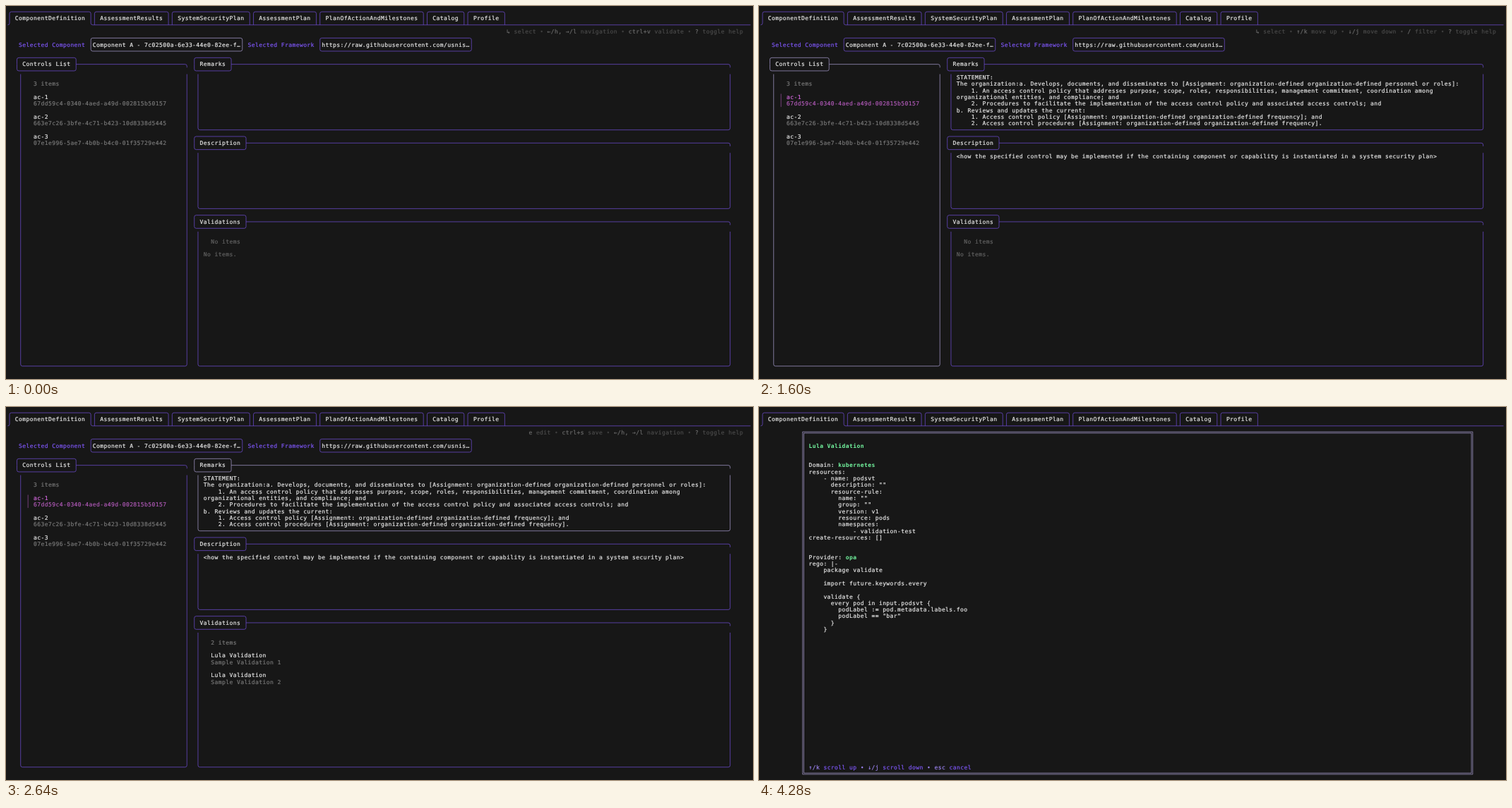
An HTML page for the animation above (8.4 s loop, 1058 by 529 pixels).

```html
<!DOCTYPE html>
<html lang="en">
<head>
<meta charset="utf-8">
<title>Compliance console</title>
<style>
  html, body { margin: 0; width: 100%; height: 100%; overflow: hidden; background: #171717; }
  svg { display: block; width: 1058px; height: 529px; }
  text {
    font: 8px "DejaVu Sans Mono", "Liberation Mono", monospace;
    letter-spacing: .418px;
    white-space: pre;
    text-rendering: geometricPrecision;
  }
  tspan { color: #e8e8e8; fill: currentColor; stroke: currentColor; stroke-width: .2; }
  path { fill: none; stroke: #7d56f4; stroke-width: .62; }
  .focus path, .modal path { stroke: #bfb2eb; }
  .label { color: #7d56f4; }
  .dim { color: #777; }
  .empty { color: #626262; }
  .key { color: #6a6a6a; }
  .desc { color: #4a4a4a; }
  .dot { color: #404040; }
  .good { color: #73f59f; font-weight: bold; stroke: none; }
  .modalKey { color: #9a82ee; }
  .bar { display: none; }
  .picked .bar { display: inline; stroke: #ad58b4; }
  .picked .name { color: #d468de; }
  .picked .dim { color: #ad58b4; }
  .hidden { display: none; }
</style>
</head>
<body>
<svg viewBox="0 0 1058 529"></svg>
<script>
const CELL_W = 5.234, CELL_H = 9.306, LEFT = 2.4, RADIUS = 2.6;
const LOOP = 8400;
const svg = document.querySelector('svg');

const midX = col => LEFT + (col + .5) * CELL_W;
const midY = row => 8.2 + row * CELL_H;

function add(parent, tag, attrs = {}) {
  const el = document.createElementNS('http://www.w3.org/2000/svg', tag);
  for (const name in attrs) el.setAttribute(name, attrs[name]);
  return parent.appendChild(el);
}
const group = (parent, cls = '') => add(parent, 'g', { class: cls });
const line = (parent, d, cls = '') => add(parent, 'path', { d, class: cls });

// Each run is a plain string or a [string, class] pair.
function write(parent, col, row, ...runs) {
  const el = add(parent, 'text', { x: LEFT + col * CELL_W, y: midY(row) + 2.8 });
  for (const run of runs) {
    const [str, cls] = [].concat(run);
    add(el, 'tspan', { class: cls || '' }).textContent = str;
  }
}
const writeLines = (parent, col, row, lines) =>
  lines.forEach((str, i) => str && write(parent, col, row + i, str));

function roundTop(x0, x1, top) {
  const r = RADIUS;
  return `V${top + r}Q${x0} ${top} ${x0 + r} ${top}H${x1 - r}Q${x1} ${top} ${x1} ${top + r}`;
}
function roundBottom(x0, x1, bottom) {
  const r = RADIUS;
  return `V${bottom - r}Q${x0} ${bottom} ${x0 + r} ${bottom}H${x1 - r}Q${x1} ${bottom} ${x1} ${bottom - r}`;
}
function box(parent, c0, r0, c1, r1) {
  const x0 = midX(c0), x1 = midX(c1), top = midY(r0), bottom = midY(r1), y = (top + bottom) / 2;
  line(parent, `M${x0} ${y}${roundTop(x0, x1, top)}V${y}M${x0} ${y}${roundBottom(x0, x1, bottom)}V${y}`);
}

function drawTabs() {
  const names = ['ComponentDefinition', 'AssessmentResults', 'SystemSecurityPlan', 'AssessmentPlan',
    'PlanOfActionAndMilestones', 'Catalog', 'Profile'];
  const top = midY(0), base = midY(2), r = RADIUS;
  let col = 0;
  names.forEach((name, i) => {
    const end = col + name.length + 3, x0 = midX(col), x1 = midX(end), cap = roundTop(x0, x1, top);
    line(svg, i
      ? `M${x0} ${base}${cap}V${base}`
      : `M${LEFT} ${base}Q${x0} ${base} ${x0} ${base - r}${cap}V${base - r}Q${x1} ${base} ${x1 + r} ${base}H1054.5`);
    write(svg, col + 2, 1, name);
    col = end + 1;
  });
}

function panel(parent, title, col, row, right, bottom) {
  const g = group(parent), frame = group(g);
  const end = col + title.length + 3;
  const x0 = midX(col + 1), x1 = midX(right), y = midY(row), r = RADIUS;
  const sideTop = midY(row + 1.5);
  box(frame, col, row - 1, end, row + 1);
  line(frame, `M${midX(end)} ${y}H${x1 - r}Q${x1} ${y} ${x1} ${y + r}V${midY(row + .5)}`);
  line(frame, `M${x0} ${sideTop}${roundBottom(x0, x1, midY(bottom))}V${sideTop}`);
  write(g, col + 2, row, title);
  return { g, frame };
}

function selector(parent, label, col, value) {
  write(parent, col, 5, [label, 'label']);
  const frame = group(parent), left = col + 19;
  box(frame, left, 4, left + 41, 6);
  write(parent, left + 1, 5, value);
  return { frame };
}

function item(parent, col, row, name, detail) {
  const g = group(parent);
  line(g, `M${midX(col - 2)} ${midY(row - .5)}V${midY(row + 1.5)}`, 'bar');
  write(g, col, row, [name, 'name']);
  write(g, col, row + 1, [detail, 'dim']);
  return g;
}

function helpRuns(entries, keyCls, descCls, dotCls) {
  return entries.flatMap(([key, text], i) =>
    [...(i ? [[' • ', dotCls]] : []), [key, keyCls], [' ' + text, descCls]]);
}
function help(parent, entries) {
  const g = group(parent, 'hidden');
  const runs = helpRuns([...entries, ['?', 'toggle help']], 'key', 'desc', 'dot');
  const length = runs.reduce((sum, [str]) => sum + str.length, 0);
  write(g, 199 - length, 3, ...runs);
  return g;
}

drawTabs();
const main = group(svg);
const move = [['↑/k', 'move up'], ['↓/j', 'move down'], ['/', 'filter']];
const navigate = ['←/h, →/l', 'navigation'];
const helps = {
  select: help(main, [['↳', 'select'], navigate, ['ctrl+v', 'validate']]),
  list: help(main, [['↳', 'select'], ...move]),
  edit: help(main, [['e', 'edit'], ['ctrl+s', 'save'], navigate]),
  detail: help(main, [['d', 'detail'], ...move])
};
const parts = {
  component: selector(main, 'Selected Component', 3, 'Component A - 7c02500a-6e33-44e0-82ee-f…'),
  framework: selector(main, 'Selected Framework', 65, 'https://raw.githubusercontent.com/usnis…'),
  controls: panel(main, 'Controls List', 2, 8, 48, 54),
  remarks: panel(main, 'Remarks', 50, 8, 195, 18),
  description: panel(main, 'Description', 50, 20, 195, 30),
  validations: panel(main, 'Validations', 50, 32, 195, 54)
};

const controls = parts.controls.g;
write(controls, 7, 11, ['3 items', 'dim']);
const control = item(controls, 7, 13, 'ac-1', '67dd59c4-0340-4aed-a49d-002815b50157');
item(controls, 7, 16, 'ac-2', '663e7c26-3bfe-4c71-b423-10d8338d5445');
item(controls, 7, 19, 'ac-3', '07e1e996-5ae7-4b0b-b4c0-01f35729e442');

const prose = group(main);
writeLines(prose, 53, 10, [
  'STATEMENT:',
  'The organization:a. Develops, documents, and disseminates to [Assignment: organization-defined organization-defined personnel or roles]:',
  '    1. An access control policy that addresses purpose, scope, roles, responsibilities, management commitment, coordination among',
  'organizational entities, and compliance; and',
  '    2. Procedures to facilitate the implementation of the access control policy and associated access controls; and',
  'b. Reviews and updates the current:',
  '    1. Access control policy [Assignment: organization-defined organization-defined frequency]; and',
  '    2. Access control procedures [Assignment: organization-defined organization-defined frequency].'
]);
write(prose, 53, 22, '<how the specified control may be implemented if the containing component or capability is instantiated in a system security plan>');

const noItems = group(main);
write(noItems, 55, 35, ['No items', 'empty']);
write(noItems, 53, 37, ['No items.', 'empty']);
const found = group(main);
write(found, 55, 35, ['2 items', 'dim']);
const validation = item(found, 55, 37, 'Lula Validation', 'Sample Validation 1');
item(found, 55, 40, 'Lula Validation', 'Sample Validation 2');

const modal = group(svg, 'modal');
for (const inset of [-.9, .9]) {
  const x0 = midX(11) + inset, x1 = midX(192) - inset, y0 = midY(3) + inset, y1 = midY(55) - inset;
  line(modal, `M${x0} ${y0}H${x1}V${y1}H${x0}Z`);
}
write(modal, 13, 5, ['Lula Validation', 'good']);
write(modal, 13, 8, 'Domain: ', ['kubernetes', 'good']);
writeLines(modal, 13, 9, [
  'resources:',
  '    - name: podsvt',
  '      description: ""',
  '      resource-rule:',
  '        name: ""',
  '        group: ""',
  '        version: v1',
  '        resource: pods',
  '        namespaces:',
  '            - validation-test',
  'create-resources: []'
]);
write(modal, 13, 22, 'Provider: ', ['opa', 'good']);
writeLines(modal, 13, 23, [
  'rego: |-',
  '    package validate',
  '',
  '    import future.keywords.every',
  '',
  '    validate {',
  '      every pod in input.podsvt {',
  '        podLabel := pod.metadata.labels.foo',
  '        podLabel == "bar"',
  '      }',
  '    }'
]);
write(modal, 13, 54, ...helpRuns(
  [['↑/k', 'scroll up'], ['↓/j', 'scroll down'], ['esc', 'cancel']], 'modalKey', 'label', 'modalKey'));

// Filled: 0 empty, 1 prose only, 2 prose and validations.
const steps = [
  { at: 0, focus: 'component', help: 'select', filled: 0 },
  { at: 520, focus: 'framework', help: 'select', filled: 0 },
  { at: 1080, focus: 'controls', help: 'list', filled: 0 },
  { at: 1600, focus: 'controls', help: 'list', filled: 1 },
  { at: 1640, focus: 'controls', help: 'list', filled: 2 },
  { at: 2640, focus: 'remarks', help: 'edit', filled: 2 },
  { at: 3200, focus: 'description', help: 'edit', filled: 2 },
  { at: 3720, focus: 'validations', help: 'detail', filled: 2 },
  { at: 4280, focus: 'validations', help: 'detail', filled: 2, modal: true }
];

const show = (el, on) => el.classList.toggle('hidden', !on);
function render(step) {
  show(main, !step.modal);
  show(modal, step.modal);
  for (const name in parts) parts[name].frame.classList.toggle('focus', name === step.focus);
  for (const name in helps) show(helps[name], name === step.help);
  show(prose, step.filled > 0);
  show(found, step.filled > 1);
  show(noItems, step.filled < 2);
  control.classList.toggle('picked', step.at >= 1080);
  validation.classList.toggle('picked', step.focus === 'validations');
}

const start = performance.now();
let current;
function tick() {
  const time = (performance.now() - start) % LOOP;
  const step = steps.findLast(s => s.at <= time);
  if (step !== current) render(current = step);
  requestAnimationFrame(tick);
}
tick();
</script>
</body>
</html>
```
